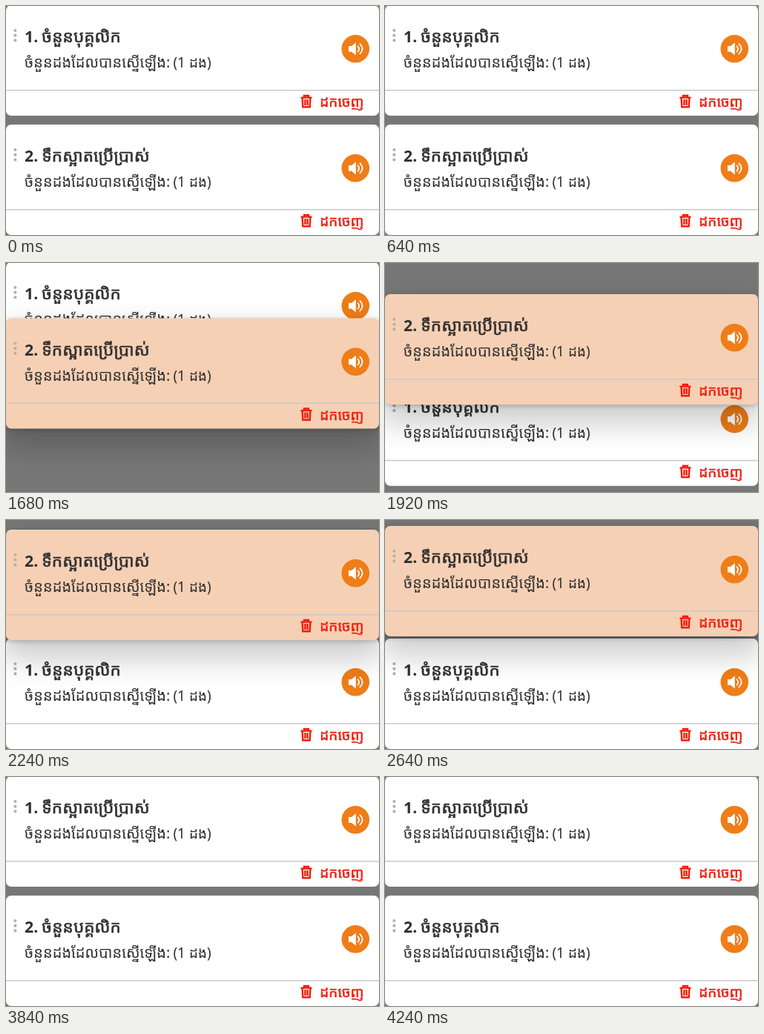
Write an HTML page that moves like this. It is 503 px wide and 309 px high and loops after 4320 ms.

```html
<!DOCTYPE html>
<html lang="km">
<head>
<meta charset="utf-8">
<style>
html, body { margin: 0; width: 100%; height: 100%; overflow: hidden; background: #777; }
.card { position: absolute; left: 0; top: -1px; width: 503px; height: 149px; border-radius: 7px; background: #fff; }
svg { display: block; font: 19px 'Noto Sans', 'Noto Sans Khmer', 'Open Sans', sans-serif; fill: #303030; }
.num { font-size: 21.3px; font-weight: 600; }
.title { font-size: 22.6px; stroke: #303030; stroke-width: .6; }
.label { font-size: 20px; }
.remove { fill: #f01c0c; stroke: #f01c0c; stroke-width: .5; }
.icon { fill: none; stroke: #f01c0c; stroke-width: 2.4; }
</style>
</head>
<body>
<script>
const LOOP = 4320, STEP = 80, GAP = 161;

function makeCard(title) {
  const el = document.createElement('div');
  el.className = 'card';
  el.innerHTML = `<svg width="503" height="149" viewBox="0 -1 503 149">
    <g fill="#b2b2b2"><circle cx="12.4" cy="33" r="2.1"/><circle cx="12.4" cy="39.7" r="2.1"/><circle cx="12.4" cy="46.4" r="2.1"/></g>
    <text class="num" x="25" y="49"></text>
    <text class="title" x="48.3" y="49">${title}</text>
    <text class="label" x="25" y="83">ចំនួនដងដែលបានស្នើឡើង:</text>
    <text x="225.4" y="83">(1 ដង)</text>
    <path d="M0 113.7H503" stroke="#c9c9c9" stroke-width="1.5"/>
    <circle cx="471.3" cy="57.8" r="18.8" fill="#ef7d18"/>
    <path d="M462 54.1h4l5.8-4.9v17.4l-5.8-4.9h-4z" fill="#fff"/>
    <path d="M474.6 54.2q3 3.7 0 7.4M477.4 51.1q6.4 6.7 0 13.4" fill="none" stroke="#fff" stroke-width="1.8" stroke-linecap="round"/>
    <path class="icon" d="M397.5 123.6h15M402 123v-2h6v2M399.6 124l.7 12.2h9.4l.7-12.2M403.4 126v8M406.6 126v8"/>
    <text class="remove" x="423.3" y="136">ដកចេញ</text>
  </svg>`;
  document.body.append(el);
  return { el, num: el.querySelector('.num') };
}

const still = makeCard('ចំនួនបុគ្គលិក');
const dragged = makeCard('ទឹកស្អាតប្រើប្រាស់');

// Drag path as [time, offset]
const path = [[0, 161], [1120, 161], [1680, 75.5], [1920, 43], [2240, 14], [2400, 10], [2640, 9], [2880, 8], [3120, 0], [LOOP, 0]];

const ramp = (t, a, b) => Math.min(1, Math.max(0, (t - a) / (b - a)));
const mix = (a, b, u) => a + (b - a) * u;

function along(t) {
  const i = path.findIndex(p => p[0] > t);
  const [a, b] = [path[i - 1], path[i]];
  return mix(a[1], b[1], ramp(t, a[0], b[0]));
}

function place(card, y) {
  card.el.style.transform = `translateY(${y}px)`;
}

function draw(now) {
  const t = Math.floor(now % LOOP / STEP) * STEP;
  const release = 1 - ramp(t, 3360, 3600);
  const tint = ramp(t, 720, 960) * release;
  const lift = ramp(t, 1120, 1360) * mix(1, .7, ramp(t, 2800, 3200)) * release;
  const swap = 1 - (1 - ramp(t, 1680, 1990)) ** 2;

  place(dragged, along(t));
  place(still, GAP * swap);
  const tone = [246, 208, 180].map(c => mix(255, c, tint));
  dragged.el.style.background = `rgb(${tone})`;
  dragged.el.style.boxShadow = `0 20px 40px 6px rgba(0,0,0,${.2 * lift}), 0 2px 6px rgba(0,0,0,${.2 * lift})`;

  const swapped = t >= 3520;
  still.num.textContent = swapped ? '2.' : '1.';
  dragged.num.textContent = swapped ? '1.' : '2.';
}

const start = performance.now();
function tick() {
  draw(performance.now() - start);
  requestAnimationFrame(tick);
}
tick();
</script>
</body>
</html>
```
